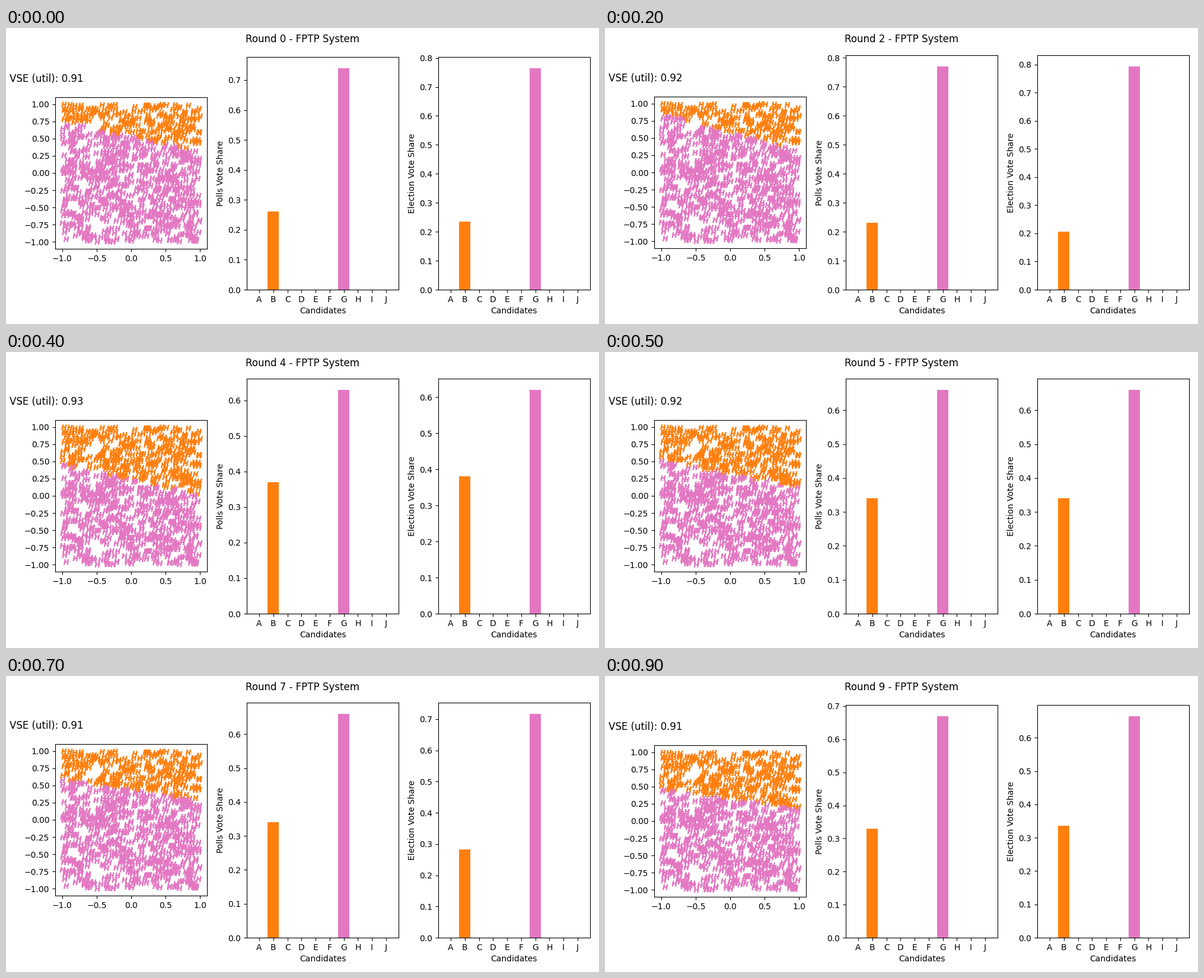
Recreate the animation shown at these times as a matplotlib script. Size 1000 px wide and 500 px high, loop 1 s.

```python
import numpy as np
import matplotlib.pyplot as plt
from matplotlib.animation import FuncAnimation
from matplotlib.ticker import MultipleLocator

W, H = 1000, 500
PANEL = 256            # panel width in pixels
BASE = 442             # baseline of the bar charts, from the top
ORANGE, PINK = "tab:orange", "tab:pink"
VOTERS = 1000

# Per round: poll share of B, election share of B, border slope, VSE, chart top
ROUNDS = [
    (0.26, 0.235, -0.22, 0.91, 49),
    (0.30, 0.210, -0.27, 0.91, 45),
    (0.23, 0.207, -0.28, 0.92, 46),
    (0.30, 0.295, -0.25, 0.92, 45),
    (0.37, 0.380, -0.22, 0.93, 45),
    (0.34, 0.340, -0.19, 0.92, 45),
    (0.32, 0.301, -0.17, 0.91, 45),
    (0.34, 0.283, -0.165, 0.91, 45),
    (0.36, 0.265, -0.16, 0.91, 45),
    (0.33, 0.335, -0.13, 0.91, 49),
]

# Sparse spots in the electorate: x, y, radius
VOIDS = [(-0.50, 0.72, 0.11), (-0.50, -0.76, 0.12),
         (-0.06, 0.97, 0.09), (-0.85, -0.47, 0.09)]


def make_voters():
    rng = np.random.default_rng(7)
    pts = rng.uniform(-1, 1, (VOTERS * 2, 2))
    keep = np.ones(len(pts), bool)
    for x, y, r in VOIDS:
        keep &= np.hypot(pts[:, 0] - x, pts[:, 1] - y) > r
    return pts[keep][:VOTERS]


def place(ax, left, top, bottom):
    ax.set_position([left / W, 1 - bottom / H, PANEL / W, (bottom - top) / H])


def bar_panel(label):
    ax = fig.add_axes([0.4, 0.1, 0.25, 0.8], label=label)
    bars = ax.bar(list("ABCDEFGHIJ"), [0] * 10)
    for i, bar in enumerate(bars):
        bar.set_color(f"C{i}")
        bar.set_linewidth(0)
    ax.set_xlim(-0.89, 9.89)
    ax.yaxis.set_major_locator(MultipleLocator(0.1))
    ax.set_xlabel("Candidates")
    ax.set_ylabel(label)
    return ax, bars


def set_shares(panel, left, top, share):
    ax, bars = panel
    bars[1].set_height(share)
    bars[6].set_height(1 - share)
    ax.set_ylim(0, 1.05 * max(share, 1 - share))
    place(ax, left, top, BASE)


fig = plt.figure(figsize=(W / 100, H / 100), dpi=100)
title = fig.suptitle("")

voters = make_voters()
space = fig.add_axes([0.08, 0.25, 0.25, 0.5], label="space")
cloud = space.scatter(voters[:, 0], voters[:, 1], marker="$H$", color=PINK)
space.set(xlim=(-1.1, 1.1), ylim=(-1.1, 1.1))
space.xaxis.set_major_locator(MultipleLocator(0.5))
space.yaxis.set_major_locator(MultipleLocator(0.25))
vse_text = space.text(-0.3, 1.1, "", fontsize=12, transform=space.transAxes)

polls = bar_panel("Polls Vote Share")
election = bar_panel("Election Vote Share")


def update(i):
    poll, vote, slope, vse, top = ROUNDS[i]
    title.set_text(f"Round {i} - FPTP System")
    vse_text.set_text(f"VSE (util): {vse:.2f}")

    # The border height follows from the area that B holds
    border = 1 - 2 * vote + slope * voters[:, 0]
    cloud.set_color(np.where(voters[:, 1] > border, ORANGE, PINK).tolist())
    square_top = (BASE + top) // 2 - PANEL // 2
    place(space, 83, square_top, square_top + PANEL)

    set_shares(polls, 406, top, poll)
    set_shares(election, 729, top, vote)
    return []


anim = FuncAnimation(fig, update, frames=len(ROUNDS), init_func=lambda: update(0),
                     interval=100, repeat=True, repeat_delay=0, blit=False)
plt.show()
```
